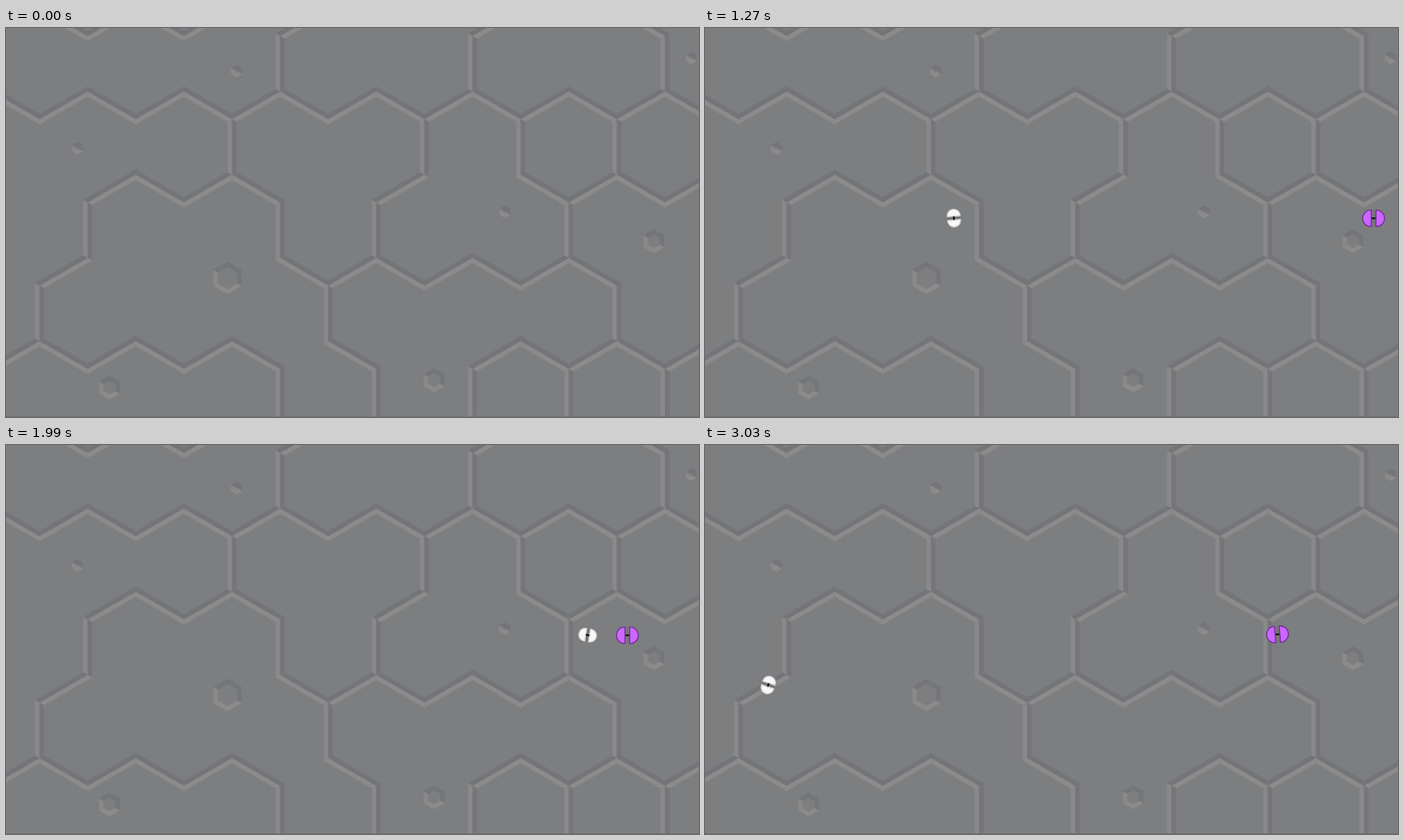
Write an HTML page with a canvas that moves like this. It is 998x561 px and loops after 3.05 s.

```html
<!DOCTYPE html>
<html lang="en">
<head>
<meta charset="utf-8">
<title>Two pills on hex tiles</title>
<style>
  html, body { margin: 0; width: 100%; height: 100%; overflow: hidden; background: #7d7e80; }
  canvas { display: block; }
</style>
</head>
<body>
<canvas id="stage" width="998" height="561"></canvas>
<script>
const W = 998, H = 561, LOOP = 3050;
const SIDE = 80, BEVEL = 6.5, COS30 = Math.sqrt(3) / 2;
const FLOOR = '#7d7e80';
const LIGHT = '#8b8b8b', LIGHT_UP = '#898989';
const DARK = '#747579', DARK_UP = '#75767b';

const ctx = document.getElementById('stage').getContext('2d');
const floor = document.createElement('canvas');
floor.width = W;
floor.height = H;

function fillPoly(g, points, color) {
  g.fillStyle = color;
  g.beginPath();
  for (const [x, y] of points) g.lineTo(x, y);
  g.closePath();
  g.fill();
}

// Hex grid: each row is a zigzag, peaks alternate with valleys.
const isPeak = (i, row) => (i + row) % 2 === 0;
const vertex = (i, row) => [
  48.3 + i * SIDE * COS30,
  11.5 + row * SIDE * 1.5 - (isPeak(i, row) ? SIDE / 2 : 0)
];

// Where each row's ridge runs, and the extra uprights that split its runs.
const RUNS = [
  [[0, 4], [5, 6], [9, 10], [12, 13]],
  [[-1, 14]],
  [[1, 5], [7, 8], [10, 14]],
  [[0, 1], [5, 12]],
  [[-1, 5], [6, 7], [9, 14]]
];
const JUNCTIONS = [[4, 1], [12, 1], [11, 2], [11, 4], [13, 4]];

function buildEdges() {
  const edges = new Map();
  const add = (a, b) => edges.set([...a, ...b].join(), [vertex(...a), vertex(...b)]);
  const addUpright = (i, row) =>
    isPeak(i, row) ? add([i, row - 1], [i, row]) : add([i, row], [i, row + 1]);
  RUNS.forEach((runs, row) => {
    for (const [from, to] of runs) {
      for (let i = from; i < to; i++) add([i, row], [i + 1, row]);
      // A run never dangles: each end turns into an upright.
      addUpright(from, row);
      addUpright(to, row);
    }
  });
  for (const j of JUNCTIONS) addUpright(...j);
  return [...edges.values()];
}

function drawRidges(g) {
  const edges = buildEdges();
  const hasEdge = (x, y) => edges.some(([a, b]) =>
    Math.hypot((a[0] + b[0]) / 2 - x, (a[1] + b[1]) / 2 - y) < 4);

  // Mitred corner: cut short where another ridge leaves on the same side.
  function corner([x, y], dx, dy, nx, ny) {
    const half = SIDE / 2;
    const met = hasEdge(x + (nx * COS30 - dx / 2) * half, y + (ny * COS30 - dy / 2) * half);
    const slide = (met ? 1 : -1) * BEVEL / Math.sqrt(3);
    return [x + nx * BEVEL + dx * slide, y + ny * BEVEL + dy * slide];
  }

  for (const [a, b] of edges) {
    const dx = (b[0] - a[0]) / SIDE, dy = (b[1] - a[1]) / SIDE;
    const up = Math.abs(dx) < 0.1;
    for (const s of [1, -1]) {
      const nx = -dy * s, ny = dx * s;
      const color = s > 0 ? (up ? LIGHT_UP : LIGHT) : (up ? DARK_UP : DARK);
      fillPoly(g, [a, b, corner(b, -dx, -dy, nx, ny), corner(a, dx, dy, nx, ny)], color);
    }
  }
}

// Hole centres by apothem.
const HOLES = {
  8: [[103, 173.5], [332, 62], [718.5, 265], [987, 43]],
  15: [[933, 307.5], [149, 518.5], [616.5, 508]],
  20.4: [[319, 360.5]]
};

function drawHole(g, x, y, apothem) {
  const tones = [DARK, DARK_UP, LIGHT, LIGHT, LIGHT_UP, DARK];
  const at = (k, a) => {
    const r = a / COS30, t = (k * 60 - 90) * Math.PI / 180;
    return [x + r * Math.cos(t), y + r * Math.sin(t)];
  };
  const inner = apothem - BEVEL;
  tones.forEach((tone, k) =>
    fillPoly(g, [at(k, apothem), at(k + 1, apothem), at(k + 1, inner), at(k, inner)], tone));
}

function drawFloor() {
  const g = floor.getContext('2d');
  g.fillStyle = FLOOR;
  g.fillRect(0, 0, W, H);
  drawRidges(g);
  for (const [apothem, centres] of Object.entries(HOLES))
    for (const [x, y] of centres) drawHole(g, x, y, +apothem);
  g.fillStyle = '#6f7072';
  g.fillRect(0, H - 1, W, 1);
}

// Two domes either side of a thin bar, linked by a short black rod.
function drawPill({ r, flat, straight, fill, edge }, { x, y, angle }) {
  ctx.save();
  ctx.translate(x, y);
  ctx.rotate(angle * Math.PI / 180);
  ctx.fillStyle = '#757678';
  ctx.fillRect(-2, -r, 4, r * 2);
  ctx.fillStyle = fill;
  ctx.strokeStyle = edge;
  ctx.lineWidth = 1.6;
  ctx.lineJoin = 'round';
  for (const s of [1, -1]) {
    ctx.beginPath();
    ctx.moveTo(s * flat, -r);
    ctx.arc(s * (flat + straight), 0, r, -Math.PI / 2, Math.PI / 2, s < 0);
    ctx.lineTo(s * flat, r);
    ctx.closePath();
    ctx.fill();
    ctx.stroke();
  }
  ctx.fillStyle = '#111';
  ctx.fillRect(-2.6, -1.2, 5.2, 2.4);
  ctx.restore();
}

// Each pill drifts and spins steadily; both change course at the collision.
// Speeds are px per ms, spin is degrees per ms.
const START = 740, HITCH = 50, HIT = 2024, END = 3030;
const WHITE = {
  r: 9.2, flat: 2.8, straight: 0.7, fill: '#f8f8f8', edge: '#d6d6d6',
  x: 860.2, y: 274.2, angle: 14.3,
  before: { vx: 0.6655, vy: 0, spin: 0.1452 },
  after: { vx: -0.7645, vy: 0.0714, spin: 2.598 }
};
const PURPLE = {
  r: 11.9, flat: 3.4, straight: 0.4, fill: '#cc66ff', edge: '#71309a',
  x: 891.6, y: 274.4, angle: 0,
  before: { vx: -0.0945, vy: 0, spin: 0 },
  after: { vx: -0.0668, vy: -0.0013, spin: -0.005 }
};

function pose(pill, t) {
  const dt = t - HIT;
  const { vx, vy, spin } = dt < 0 ? pill.before : pill.after;
  return { x: pill.x + vx * dt, y: pill.y + vy * dt, angle: pill.angle + spin * dt };
}

function render() {
  const t = performance.now() % LOOP;
  ctx.drawImage(floor, 0, 0);
  if (t >= START) {
    // The pills pause briefly at the rim before running on.
    const step = t < START + HITCH ? START - 17 : Math.min(END, Math.floor(t / 10) * 10);
    for (const pill of [PURPLE, WHITE]) drawPill(pill, pose(pill, step));
  }
  requestAnimationFrame(render);
}

drawFloor();
render();
</script>
</body>
</html>
```
